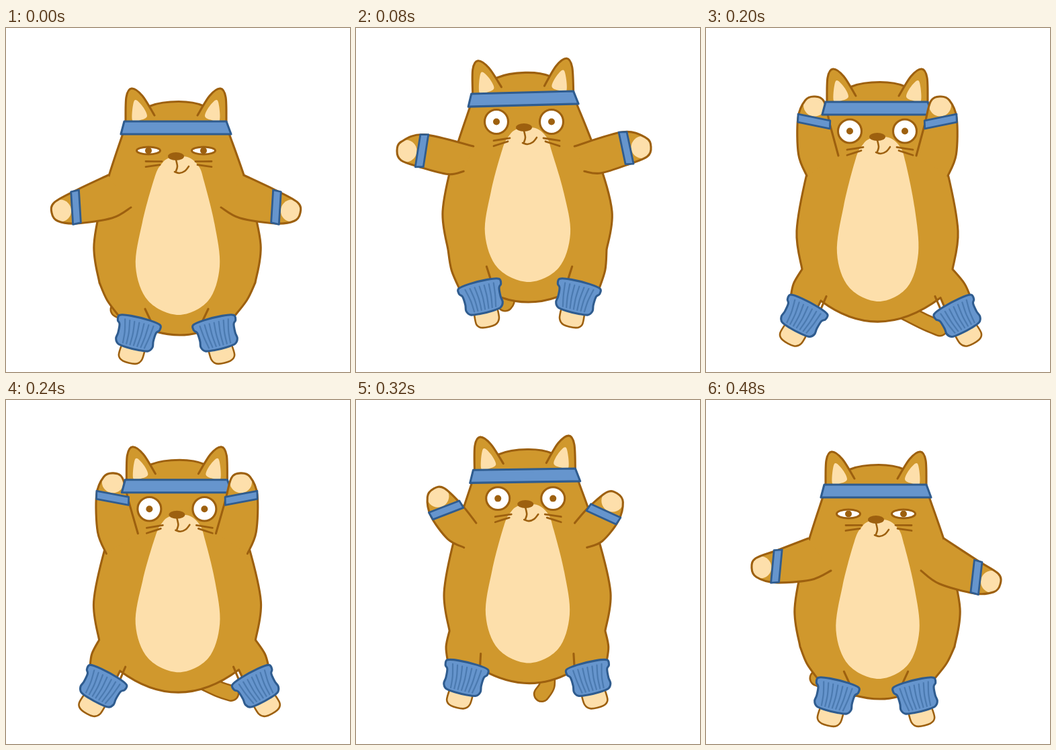
An HTML page with a canvas for the animation above (520 ms loop, 512x512 px).

```html
<!DOCTYPE html>
<html lang="en">
<head>
<meta charset="utf-8">
<title>Aerobics cat</title>
<style>
html, body { margin: 0; width: 100%; height: 100%; overflow: hidden; background: #fff; }
canvas { display: block; width: 512px; height: 512px; }
</style>
</head>
<body>
<canvas id="stage" width="512" height="512"></canvas>
<script>
const ctx = document.getElementById('stage').getContext('2d');
const FUR = '#d0982d', LINE = '#9d600f', CREAM = '#fddfab';
const BLUE = '#6695cd', NAVY = '#2f5c8f', RIB = '#4b7ab0';
const STEP = 40, STEPS = 13, MID = 255;
const SIDES = [1, -1]; // left, then its mirror image

// x, y: nose; girth: half width of the body; low: its lowest point.
// reach, drop: paw from the nose; raise: 0 shoulders down, 1 up; sway lifts the left paw.
// axis, stance, shin, lean: leg warmers; tailX, tailY: tail tip from the lowest point.
const poses = [
  { at: 0, x: 253, y: 191, tilt: 0, eye: 5.5, girth: 124, low: 457, reach: 185, drop: 84, aim: -13,
    raise: 0, sway: 0, axis: 254, stance: 60, shin: 456, lean: 14, tailX: -90, tailY: -38 },
  { at: 2, x: 250, y: 148, tilt: -1.5, eye: 18, girth: 126, low: 408, reach: 189, drop: 32, aim: 1,
    raise: .6, sway: -3, axis: 258, stance: 70, shin: 402, lean: -14, tailX: -35, tailY: 2 },
  { at: 4, x: 251, y: 132, tilt: -1, eye: 17.5, girth: 118, low: 412, reach: 136, drop: -46, aim: 58,
    raise: 1, sway: -4, axis: 259, stance: 90, shin: 407, lean: -3, tailX: 23, tailY: 44 },
  { at: 5, x: 255, y: 162, tilt: 0, eye: 17.5, girth: 120, low: 437, reach: 93, drop: -60, aim: 92,
    raise: 1, sway: 0, axis: 260, stance: 117, shin: 431, lean: 28, tailX: 91, tailY: 10 },
  { at: 7, x: 254, y: 176, tilt: 0, eye: 18, girth: 127, low: 434, reach: 96, drop: -63, aim: 91,
    raise: 1, sway: 0, axis: 257, stance: 116, shin: 427, lean: 29, tailX: 70, tailY: -4 },
  { at: 10, x: 250, y: 129, tilt: -2, eye: 15.5, girth: 120, low: 406, reach: 188, drop: 35, aim: 16,
    raise: .2, sway: 8, axis: 252, stance: 66, shin: 401, lean: -6, tailX: -44, tailY: 41 },
  { at: 12, x: 253, y: 178, tilt: 0, eye: 6.5, girth: 123, low: 445, reach: 185, drop: 84, aim: -10,
    raise: 0, sway: 12, axis: 253, stance: 61, shin: 442, lean: 14, tailX: -91, tailY: -31 }
];

const lerp = (a, b, t) => a + (b - a) * t;
const mix = (a, b, t = .5) => [lerp(a[0], b[0], t), lerp(a[1], b[1], t)];
const shift = ([x, y], dx, dy) => [x + dx, y + dy];
const mirror = half => [...half, ...half.map(([x, y]) => [-x, y]).reverse()];

function poseAt(step) {
  const from = poses.findLast(p => p.at <= step);
  const to = poses.find(p => p.at >= step);
  const t = (step - from.at) / (to.at - from.at || 1);
  const eased = t * (1.5 - t / 2);
  return Object.fromEntries(Object.keys(from).map(k => [k, lerp(from[k], to[k], eased)]));
}

// Returns a function from local to stage coordinates; side -1 mirrors.
function frame([ox, oy], degrees, side = 1) {
  const a = degrees * Math.PI / 180, c = Math.cos(a), s = Math.sin(a);
  return (x, y) => [ox + side * (x * c - y * s), oy + x * s + y * c];
}

// Adds a smooth curve through the points to a path.
function trace(path, pts, { closed = false, join = false } = {}) {
  const n = pts.length;
  const at = i => closed ? pts[(i + n) % n] : pts[Math.max(0, Math.min(n - 1, i))];
  join ? path.lineTo(...pts[0]) : path.moveTo(...pts[0]);
  for (let i = 0; i < (closed ? n : n - 1); i++) {
    const [a, b, c, d] = [at(i - 1), at(i), at(i + 1), at(i + 2)];
    path.bezierCurveTo(b[0] + (c[0] - a[0]) / 6, b[1] + (c[1] - a[1]) / 6,
      c[0] - (d[0] - b[0]) / 6, c[1] - (d[1] - b[1]) / 6, ...c);
  }
  if (closed) path.closePath();
  return path;
}
const curve = (pts, options) => trace(new Path2D(), pts, options);
const blob = pts => curve(pts, { closed: true });

function polygon(pts) {
  const path = new Path2D();
  pts.forEach(p => path.lineTo(...p));
  path.closePath();
  return path;
}

function paint(path, fill, line, width = 3.1) {
  if (fill) { ctx.fillStyle = fill; ctx.fill(path); }
  if (line) { ctx.strokeStyle = line; ctx.lineWidth = width; ctx.stroke(path); }
}

function oval([x, y], rx, ry, fill, line) {
  const path = new Path2D();
  path.ellipse(x, y, rx, ry, 0, 0, Math.PI * 2);
  paint(path, fill, line);
}

function drawTail({ low, tailX, tailY }) {
  const root = [257 + Math.max(-38, Math.min(38, tailX * 1.4)), low - 15];
  const tip = [257 + tailX, low + tailY];
  const path = curve([root, shift(mix(root, tip), 4, 3), tip]);
  paint(path, null, LINE, 25);
  paint(path, null, FUR, 20);
}

function drawBody(p, head, legs) {
  const join = { join: true };
  const flank = side => {
    const neck = head(-79 * side, -34);
    const waist = [MID - side * p.girth, p.low - 135];
    const hip = [MID - side * (p.girth - 8), p.low - 78];
    const ankle = legs[side](-29, -18);
    const [x] = legs[side](0, 0);
    const crotch = x + side * 28;
    return {
      torso: [neck, shift(mix(neck, waist), -5 * side, 0), waist, hip],
      thigh: [hip, shift(mix(hip, ankle), -4 * side, 0), ankle],
      inside: legs[side](14, -4),
      seam: [crotch, p.low - .0042 * (crotch - 257) ** 2]
    };
  };
  const l = flank(1), r = flank(-1);
  const path = curve(l.torso);
  trace(path, l.thigh, join);
  path.lineTo(...l.inside);
  path.lineTo(...l.seam);
  path.quadraticCurveTo(257, 2 * p.low - (l.seam[1] + r.seam[1]) / 2, ...r.seam);
  path.lineTo(...r.inside);
  trace(path, r.thigh.reverse(), join);
  trace(path, r.torso.reverse(), join);
  trace(path, [head(73, -50), head(41, -75), head(4, -81.5), head(-38, -75), head(-73, -50)], join);
  path.closePath();
  paint(path, FUR, LINE);
}

function drawBelly({ x, y, girth, low }) {
  const half = girth / 2, bottom = low - 30, wide = bottom - 72;
  const left = [MID - half, wide], right = [MID + half + 1, wide];
  const cheekL = [x - 32, y + 32], cheekR = [x + 42, y + 38];
  paint(blob([
    [x - 9, y + 2], [x - 22, y + 12], cheekL, shift(mix(cheekL, left), -4, 0), left,
    [MID - half * .7, bottom - 21], [MID + 2, bottom], [MID + half * .74, bottom - 21],
    right, shift(mix(cheekR, right), 4, 0), cheekR, [x + 34, y + 15], [x + 17, y + 1]
  ]), CREAM);
}

function drawEar(head, side) {
  const at = ([x, y]) => head(x * side, y);
  const ear = [[-75, -50], [-74, -88], [-66, -101], [-50, -90], [-32, -61]];
  const lining = [[-62, -83], [-65, -54], [-53, -54], [-43, -60], [-51, -76]];
  paint(curve(ear.map(at)), FUR, LINE);
  paint(blob(lining.map(at)), CREAM);
}

function drawFace({ x, y, eye }) {
  const droop = 8 + (eye - 6) * .65;
  for (const side of SIDES) {
    const centre = [x - 41 * side, y - 8.5];
    oval(centre, 17.5, eye, '#fff', LINE);
    oval(centre, 5, Math.min(5, eye), LINE);
    for (const [near, rise, fall] of [[25, 0, 0], [28, 5, 8]]) {
      paint(curve([[x + 4 - side * near, y + droop + rise],
        [x + 4 - side * 49, y + droop * 1.5 - 4 + fall]]), null, LINE, 2.8);
    }
  }
  oval([x, y], 12, 6, LINE);
  paint(curve([[x, y + 5], [x + 2, y + 15], [x, y + 22]]), null, LINE, 2.6);
  paint(curve([[x - 2, y + 23], [x + 5, y + 25], [x + 13, y + 22], [x + 19, y + 15]]), null, LINE, 2.6);
}

function drawArm(p, side) {
  const joint = (dx, dy) => [p.x - side * dx, p.y + dy];
  const hand = frame(joint(p.reach, p.drop - side * p.sway), p.aim + side * p.sway / 2, side);
  const upper = joint(lerp(101, 58, p.raise), 28);
  const lower = joint(lerp(67, 105, p.raise), lerp(76, 58, p.raise));
  const [ox, oy] = hand(0, 0), [nx, ny] = hand(0, 7);
  const sag = shift(mix(lower, hand(40, 24), .4), nx - ox, ny - oy);
  const path = curve([upper, hand(41, -24), hand(7, -14), hand(0, 0), hand(6, 14), hand(33, 24), sag, lower]);
  paint(path, FUR);
  ctx.save();
  ctx.clip(path);
  oval(hand(13, 0), 16.5, 16.5, CREAM);
  ctx.restore();
  paint(path, null, LINE);
  paint(polygon([hand(35, -24), hand(47, -24), hand(39, 24), hand(27, 24)]), BLUE, NAVY, 2.8);
}

function drawLeg(p, leg, side) {
  const cuff = leg(19, -21);
  const rise = side * (p.stance - 90) * .35;
  paint(curve([shift(cuff, rise, -22), cuff]), null, LINE);

  const foot = [[-17, 16], [-18, 36], [-10, 43], [9, 43], [17, 35], [18, 16]];
  paint(curve(foot.map(q => leg(...q))), CREAM, LINE, 2.6);

  const edge = [[14, -25], [31, -22], [32, -14], [28, -9], [27, 4], [28, 13], [23, 20], [9, 22]];
  paint(blob(mirror(edge).map(q => leg(...q))), BLUE, NAVY);
  for (let u = -.75; u < .8; u += .25) {
    paint(curve([leg(u * 29, -18), leg(u * 25 + 1, 0), leg(u * 22, 17)]), null, RIB, 2.2);
  }
}

function draw(p) {
  const head = frame([p.x, p.y], p.tilt);
  const legs = {};
  for (const side of SIDES) legs[side] = frame([p.axis - side * p.stance, p.shin], p.lean, side);

  ctx.fillStyle = '#fff';
  ctx.fillRect(0, 0, 512, 512);
  ctx.lineCap = ctx.lineJoin = 'round';
  drawTail(p);
  drawBody(p, head, legs);
  drawBelly(p);
  for (const side of SIDES) {
    drawLeg(p, legs[side], side);
    drawEar(head, side);
  }
  drawFace(p);
  drawArm(p, 1);
  paint(polygon([head(-77, -52), head(75, -52), head(82, -33), head(-82, -33)]), BLUE, NAVY);
  drawArm(p, -1);
}

function tick() {
  draw(poseAt(Math.floor(performance.now() / STEP) % STEPS));
  requestAnimationFrame(tick);
}
tick();
</script>
</body>
</html>
```
